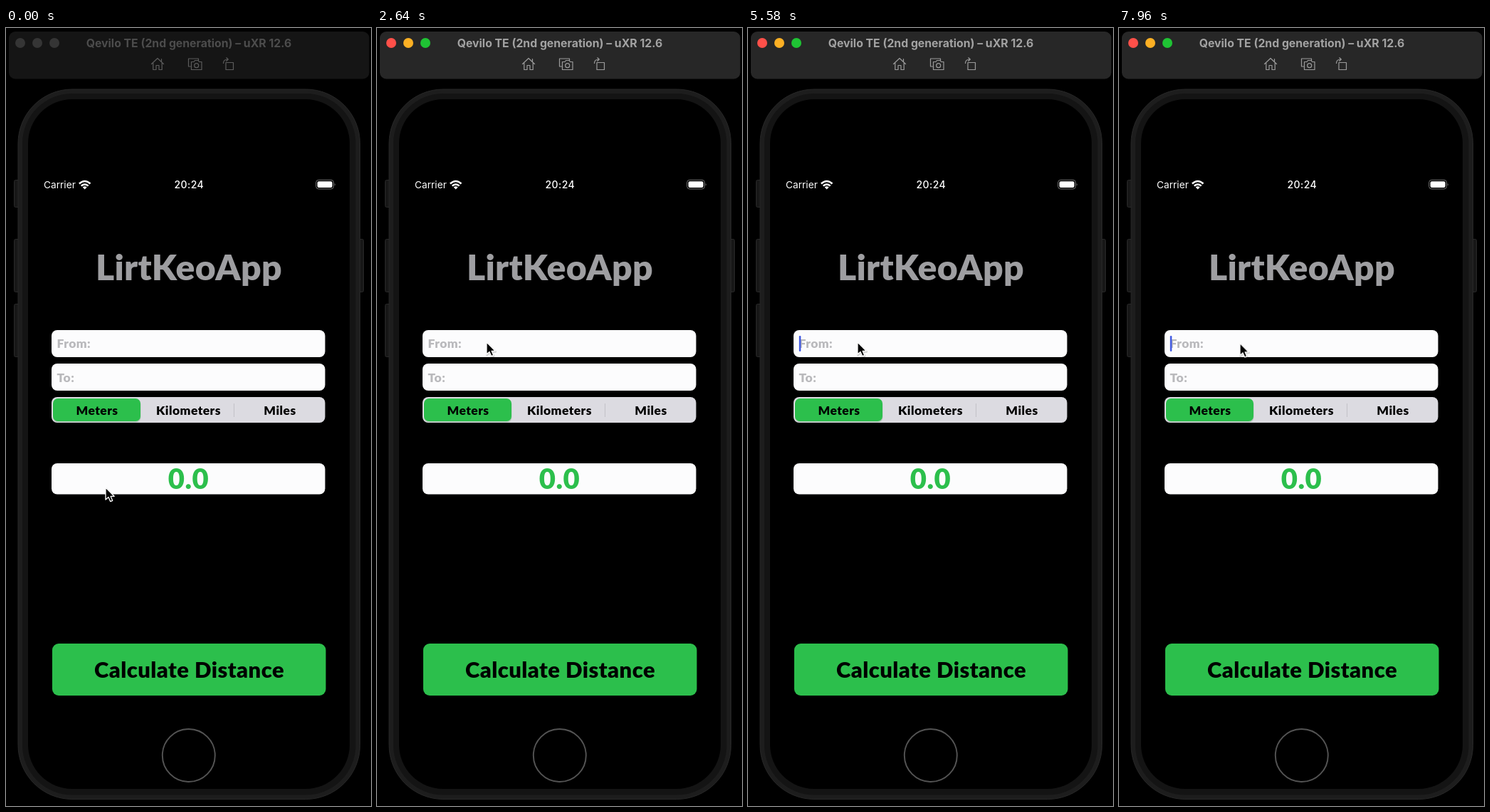
Recreate the animation shown at these times as an HTML page. Size 513 px wide and 1092 px high, loop 8000 ms.

```html
<!DOCTYPE html>
<html lang="en">
<head>
<meta charset="utf-8">
<title>Distance calculator</title>
<style>
  html, body { margin: 0; width: 100%; height: 100%; overflow: hidden; background: #000; }
  svg { display: block; width: 100%; height: 100%; }

  text { text-anchor: middle; }
  .ui { font-family: Inter, "Liberation Sans", sans-serif; }
  .app { font-family: Lato, "Open Sans", sans-serif; font-weight: 900; font-size: 17.5px; letter-spacing: .025em; }
  .start { text-anchor: start; }
  .hint { fill: #b9b9bc; }
  .field { fill: #fcfcfd; }
  .green { fill: #2cbf4c; }

  /* Window chrome: dim until the window gets focus */
  .wake { color: var(--on); fill: currentColor; animation: wake 8s step-end infinite; }
  .icons { fill: none; stroke: currentColor; stroke-width: 1.2; stroke-linejoin: round; stroke-linecap: round; }
  @keyframes wake {
    0% { color: var(--off); }
    24.5%, 100% { color: var(--on); }
  }

  .caret { fill: #4059e2; animation: caret 8s step-end infinite; }
  @keyframes caret {
    0% { opacity: 0; }
    69.75%, 100% { opacity: 1; }
  }

  .pointer { animation: point 8s linear infinite; }
  @keyframes point {
    0% { transform: translate(140px, 645px); }
    17.5% { transform: translate(140px, 645px); animation-timing-function: ease-in-out; }
    23.5% { transform: translate(154px, 441px); }
    94% { transform: translate(154px, 441px); animation-timing-function: ease-in; }
    99.5%, 100% { transform: translate(170px, 442.5px); }
  }
</style>
</head>
<body>
<svg viewBox="0 0 513 1092" xmlns="http://www.w3.org/2000/svg">
  <rect width="513" height="1092"/>

  <!-- Window bar -->
  <g class="ui">
    <rect class="wake" style="--off:#151515;--on:#272727" x="4" y="5" width="506.500" height="66.500" rx="9"/>
    <circle class="wake" style="--off:#353535;--on:#ff5049" cx="20" cy="21" r="7"/>
    <circle class="wake" style="--off:#353535;--on:#fcb024" cx="44" cy="21" r="7"/>
    <circle class="wake" style="--off:#353535;--on:#1fc334" cx="68" cy="21" r="7"/>
    <text class="wake" style="--off:#4c4c4c;--on:#a2a2a2" x="257" y="26.500" font-size="15.800" font-weight="700">Qevilo TE (2nd generation) – uXR 12.6</text>
    <g class="wake icons" style="--off:#5c5c5c;--on:#9b9b9b">
      <path d="M204.500 50.500L213 42.500L221.500 50.500M206.800 49V58.500H211V52.500H215V58.500H219.200V49M218.500 47V43.500"/>
      <path d="M259.500 54H256.500V43H270.500V46"/>
      <path d="M260.500 47.500H264L265.500 45.500H270L271.500 47.500H275V58.500H260.500Z"/>
      <circle cx="267.700" cy="52.700" r="3"/>
      <path d="M309 48.500H319.500V58.500H309ZM305.500 49.500C305.500 45.500 308 44 312 44M309.800 41.800L312.300 44L309.800 46.300"/>
    </g>
  </g>

  <!-- Phone body -->
  <g fill="#171717" stroke="#292929">
    <rect x="11.500" y="213.500" width="8" height="38" rx="2"/>
    <rect x="11.500" y="296.500" width="8" height="74" rx="2"/>
    <rect x="11.500" y="387.500" width="8" height="74" rx="2"/>
    <rect x="494.500" y="296.500" width="8" height="74" rx="2"/>
    <rect x="17" y="86" width="480.500" height="996.500" rx="76" fill="#1d1d1d" stroke="#282828"/>
  </g>
  <rect x="23" y="92" width="468.500" height="984.500" rx="70" fill="#141414"/>
  <rect x="31" y="100" width="452" height="968" rx="62"/>
  <circle cx="256.800" cy="1021" r="37" fill="none" stroke="#545454" stroke-width="1.900"/>

  <!-- Status bar -->
  <g class="ui" fill="#fff">
    <text class="start" x="53" y="225" font-size="13.700">Carrier</text>
    <text x="257.300" y="225" font-size="14" font-weight="500" letter-spacing=".4">20:24</text>
    <g fill="none" stroke="#fff" stroke-width="2.500">
      <path d="M102.900 218.500Q110.700 211.600 118.500 218.500"/>
      <path d="M105.700 221.600Q110.700 217.400 115.700 221.600"/>
    </g>
    <path d="M107.700 223.400Q110.700 221.300 113.700 223.400L110.700 226.500Z"/>
    <rect x="435.700" y="213.300" width="24.800" height="12.600" rx="3.600" fill="none" stroke="#707070"/>
    <rect x="437.600" y="215.200" width="21" height="8.800" rx="2.200"/>
    <path d="M461.800 217.600Q463.600 219.600 461.800 221.600Z" fill="#707070"/>
  </g>

  <!-- App screen -->
  <g class="app">
    <text x="257" y="354" style="font-size:50px;letter-spacing:.2px" fill="#9e9ea1">LirtKeoApp</text>

    <rect class="field" x="64" y="424" width="384.500" height="38" rx="8"/>
    <text class="start hint" x="71.500" y="449">From:</text>
    <rect class="field" x="64" y="471" width="384.500" height="38" rx="8"/>
    <text class="start hint" x="71.500" y="496.500">To:</text>

    <rect x="64" y="518" width="384.500" height="36" rx="8" fill="#dcdbe1"/>
    <rect x="66" y="521" width="123.500" height="32.500" rx="7" fill="#b7c8bd"/>
    <rect class="green" x="66" y="520" width="123" height="32" rx="7"/>
    <path d="M320.500 527V546" stroke="#c2c1c8"/>
    <text x="128" y="542.500">Meters</text>
    <text x="256.500" y="542.500">Kilometers</text>
    <text x="385" y="542.500">Miles</text>

    <rect class="field" x="64" y="611" width="384.500" height="43.500" rx="8"/>
    <text class="green" x="256.500" y="646.500" style="font-size:40px">0.0</text>

    <rect class="green" x="65" y="864" width="384.500" height="73" rx="9"/>
    <text x="257.500" y="911.500" style="font-size:31px">Calculate Distance</text>
  </g>

  <rect class="caret" x="71.800" y="432" width="2.500" height="22" rx="1.200"/>

  <g class="pointer">
    <path d="M0 0V17L4 13.400L6.700 19.600L9.700 18.300L7.100 12.300H12.200Z" transform="translate(.5 1.200)" stroke="#000" stroke-width="2.500" stroke-linejoin="round" opacity=".16"/>
    <path d="M0 0V17L4 13.400L6.700 19.600L9.700 18.300L7.100 12.300H12.200Z" stroke="#fff" stroke-width="1.300" stroke-linejoin="round"/>
  </g>
</svg>
</body>
</html>
```
